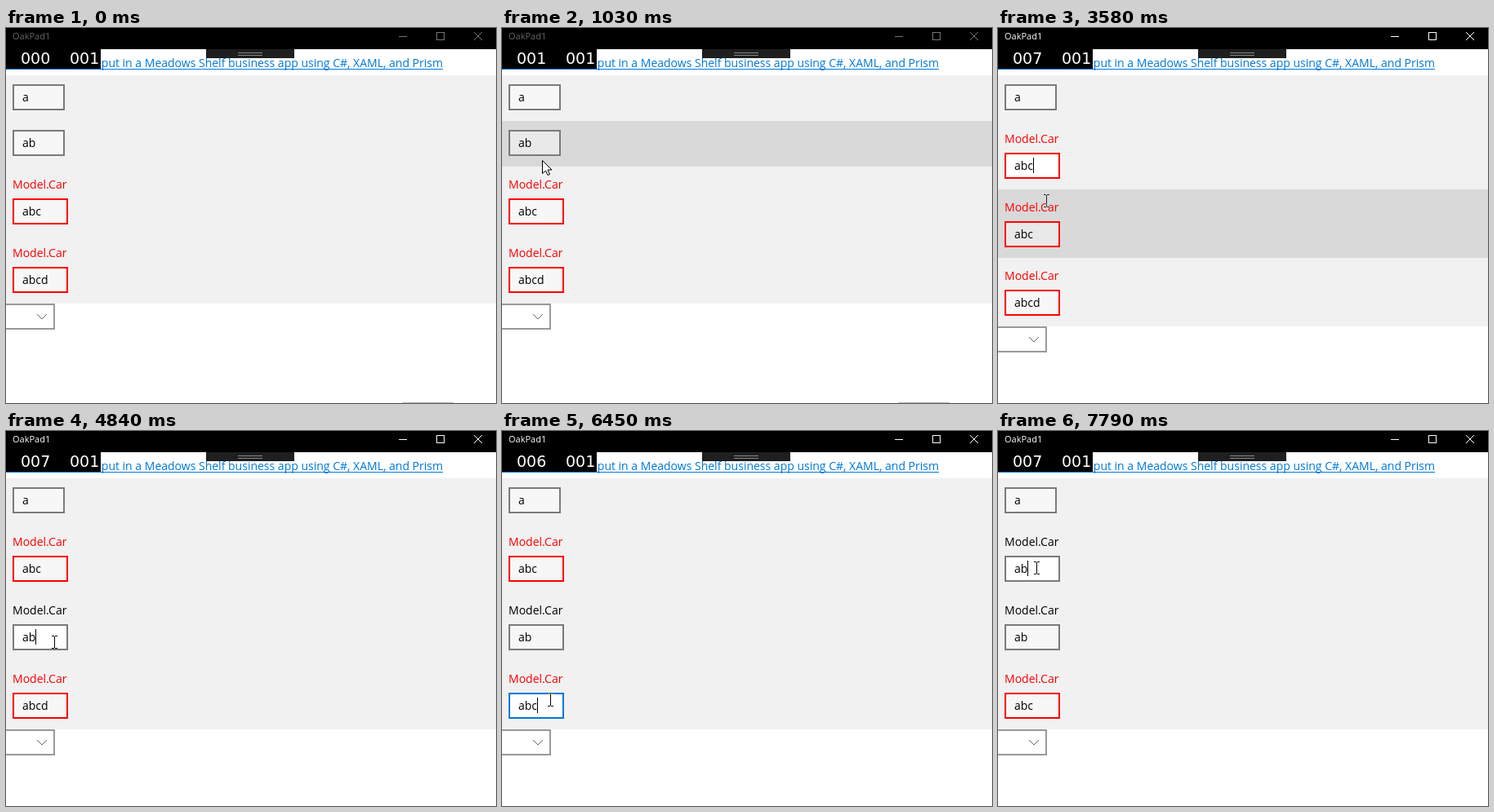
An HTML page with a canvas that plays this animation: 600x460 px, repeating every 8 s.

```html
<!DOCTYPE html>
<html lang="en">
<head>
<meta charset="utf-8">
<style>
  html, body { margin: 0; width: 600px; height: 460px; overflow: hidden; background: #fff; }
  canvas { display: block; }
</style>
</head>
<body>
<canvas id="stage" width="600" height="460"></canvas>
<script>
const LOOP = 8000;
const BLUE = '#0078d7', RED = '#f00', GREY = '#7a7a7a';
const BODY_FONT = '14px "Open Sans", "Noto Sans", sans-serif';
const TITLE_FONT = '11px "Open Sans", "Noto Sans", sans-serif';
const COUNTER_FONT = '19px "DejaVu Sans", sans-serif';
const ctx = document.getElementById('stage').getContext('2d');

const initialRows = [
  { text: 'a' },
  { text: 'ab' },
  { text: 'abc', label: true, error: true },
  { text: 'abcd', label: true, error: true },
];

// Each session: click into a row, row highlight released, then one edit.
const sessions = [
  { row: 1, click: 1960, release: 2040, edit: 2650, text: 'abc', error: true },
  { row: 2, click: 4120, release: 4290, edit: 4840, text: 'ab', error: false },
  { row: 3, click: 5990, release: 6140, edit: 6450, text: 'abc', error: true },
  { row: 1, click: 7300, release: 7470, edit: 7790, text: 'ab', error: false },
];

// time, x, y
const pointerKeys = [
  [410, 300, 440], [490, 236, 392], [560, 188, 348], [640, 148, 302],
  [720, 115, 262], [800, 90, 226], [870, 70, 196], [950, 56, 175],
  [1030, 49, 162], [1100, 49, 161], [1180, 49, 160], [1430, 51, 158],
  [1500, 53, 156], [1650, 53, 154], [1730, 54, 152],
  [3580, 59, 212], [3660, 59, 235], [3740, 59, 259],
  [5450, 59, 320], [5530, 60, 363], [5680, 60, 358], [5760, 59, 350],
  [5830, 59, 340], [5910, 59, 334], [5990, 59, 330],
  [6770, 59, 322], [6850, 59, 300], [6920, 58, 270], [7000, 56, 236],
  [7080, 53, 205], [7160, 50, 182], [7230, 48, 170], [7300, 47, 168],
];

const counterKeys = [
  [0, '000', '001'], [640, '001', '001'], [1350, '007', '002'],
  [1500, '001', '001'], [2650, '004', '002'], [2740, '007', '001'],
  [3740, '015', '002'], [4120, '007', '001'], [5450, '008', '002'],
  [5990, '006', '001'], [6770, '014', '002'], [7300, '007', '001'],
];

const lastKey = (keys, t) => keys.filter(k => k[0] <= t).pop();

function rect(x, y, w, h, color) {
  ctx.fillStyle = color;
  ctx.fillRect(x, y, w, h);
}

function text(str, x, y, color, font = BODY_FONT, align = 'left') {
  ctx.font = font;
  ctx.textAlign = align;
  ctx.fillStyle = color;
  ctx.fillText(str, x, y);
}

function line(points, color, width = 1) {
  ctx.beginPath();
  points.forEach(([x, y]) => ctx.lineTo(x, y));
  ctx.strokeStyle = color;
  ctx.lineWidth = width;
  ctx.stroke();
}

function frame(x, y, w, h, color, width) {
  ctx.strokeStyle = color;
  ctx.lineWidth = width;
  ctx.strokeRect(x + width / 2, y + width / 2, w - width, h - width);
}

function layoutRows(t) {
  const rows = initialRows.map(r => ({ ...r }));
  for (const s of sessions) {
    const row = rows[s.row];
    if (t >= s.click) row.accent = true;
    if (t >= s.edit) {
      if (s.error !== !!row.error) row.accent = false;
      row.text = s.text;
      row.error = s.error;
      row.label = row.label || s.error;
    }
  }
  let top = 58;
  for (const row of rows) {
    row.top = top;
    row.height = row.label ? 84 : 56;
    row.boxTop = top + row.height - 45;
    top += row.height;
  }
  return rows;
}

function drawRow(row, focused, hovered, boxHovered) {
  rect(0, row.top, 600, row.height, hovered ? '#d9d9d9' : '#f1f1f1');
  if (row.label) text('Model.Car', 8, row.top + 27, row.error ? RED : '#000');

  const width = row.label ? 68 : 64;
  const fill = focused ? '#fff' : `rgba(255,255,255,${boxHovered ? 0.6 : 0.4})`;
  let border = row.error ? RED : GREY;
  if (focused && row.accent) border = BLUE;
  else if (boxHovered && !focused) border = '#171717';
  rect(8, row.boxTop, width, 32, fill);
  frame(8, row.boxTop, width, 32, border, 2);
  text(row.text, 20, row.boxTop + 21, '#000');
  if (focused) {
    rect(20 + Math.floor(ctx.measureText(row.text).width), row.boxTop + 6, 1, 19, '#000');
  }
}

function drawCombo(y) {
  rect(0, y, 60, 32, '#fff');
  frame(-20, y, 80, 32, '#999', 2);
  line([[38, y + 13], [44, y + 19], [50, y + 13]], '#666');
}

function drawChrome(active, counters) {
  text('user input in a Meadows Shelf business app using C#, XAML, and Prism',
    535, 48, BLUE, BODY_FONT, 'right');
  rect(0, 50, 535, 1, BLUE);

  const iconColor = active ? '#fff' : '#777';
  rect(0, 0, 600, 26, '#000');
  text('OakPad1', 8, 14, active ? '#fff' : '#666', TITLE_FONT);
  rect(481, 10, 10, 1, iconColor);
  frame(527, 5, 10, 10, iconColor, 1);
  line([[573, 5], [583, 15]], iconColor);
  line([[583, 5], [573, 15]], iconColor);

  rect(0, 26, 116, 24, '#000');
  text(counters[1], 18, 44, '#fff', COUNTER_FONT);
  text(counters[2], 78, 44, '#fff', COUNTER_FONT);

  rect(245, 26, 108, 11, '#1f1f1f');
  rect(284, 30, 30, 1, '#888');
  rect(284, 33, 30, 1, '#888');

  if (!active) for (let x = 486; x < 547; x += 2) rect(x, 459, 1, 1, '#777');
}

function drawArrow(x, y) {
  const outline = [[0, 0], [0, 16], [4, 12.5], [6.5, 18], [9, 17], [6.5, 11.5], [11.5, 11.5]];
  ctx.beginPath();
  outline.forEach(([dx, dy]) => ctx.lineTo(x + dx + 0.5, y + dy + 0.5));
  ctx.closePath();
  ctx.fillStyle = '#fff';
  ctx.fill();
  ctx.strokeStyle = '#000';
  ctx.lineWidth = 1;
  ctx.stroke();
}

function drawBeam(x, y) {
  ctx.globalCompositeOperation = 'difference';
  rect(x, y - 7, 1, 14, '#fff');
  for (const dy of [-8, 7]) {
    rect(x - 3, y + dy, 3, 1, '#fff');
    rect(x + 1, y + dy, 3, 1, '#fff');
  }
  ctx.globalCompositeOperation = 'source-over';
}

function draw(t) {
  const rows = layoutRows(t);
  const session = sessions.filter(s => s.click <= t).pop();
  const pointer = lastKey(pointerKeys, t);
  const [movedAt, px, py] = pointer || [0, -1, -1];
  const under = rows.find(r => py >= r.top && py < r.top + r.height);
  const released = session && t >= session.release && movedAt <= session.click;

  rect(0, 0, 600, 460, '#fff');
  rows.forEach((row, i) => {
    const hovered = row === under && !released;
    const boxHovered = hovered && px >= 8 && px < 76 && py >= row.boxTop && py < row.boxTop + 32;
    drawRow(row, !!session && session.row === i, hovered, boxHovered);
  });
  const last = rows[rows.length - 1];
  drawCombo(last.top + last.height);
  drawChrome(!!session, lastKey(counterKeys, t));

  if (!pointer) return;
  const overText = under && px < 76 && py >= under.top + 11 && py < under.boxTop + 32;
  (overText ? drawBeam : drawArrow)(px, py);
}

const start = performance.now();
function tick() {
  draw((performance.now() - start) % LOOP);
  requestAnimationFrame(tick);
}
tick();
</script>
</body>
</html>
```
